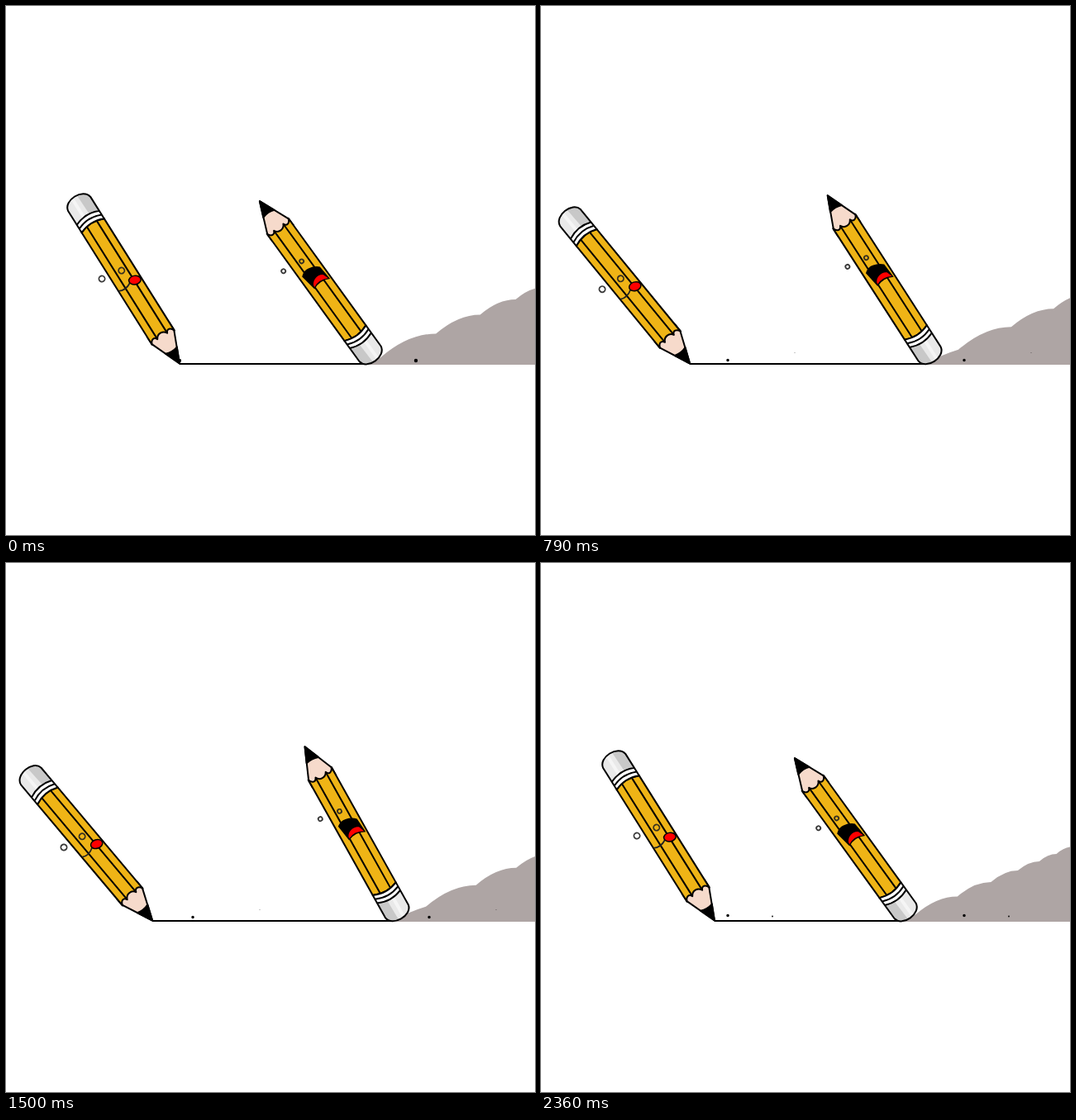
Write an HTML page that moves like this. It is 640 px wide and 640 px high and loops after 2430 ms.

```html
<!DOCTYPE html>
<html lang="en">
<head>
<meta charset="utf-8">
<title>Pencils</title>
<style>
  html, body { margin: 0; width: 100%; height: 100%; overflow: hidden; background: #fff; }
  svg { display: block; width: 100vw; height: 100vh; }
  .ink { stroke: #000; stroke-width: 2; stroke-linejoin: round; stroke-linecap: round; }
  .eye { fill: none; stroke: #222; stroke-opacity: .9; stroke-width: 1.8; }
</style>
</head>
<body>
<svg viewBox="0 0 640 640">
  <defs>
    <!-- tip at the origin, eraser upwards -->
    <g id="pencil">
      <path class="ink" fill="#f6dacb" d="M0 0L-16 -38V-48H16V-38Z"/>
      <path class="ink" d="M0 0L-8 -19Q0 -16 8 -18.5Z"/>
      <path class="ink" fill="#efb416" d="M-16 -197V-37C-14 -43 -9 -44 -7 -39C-4 -45 4 -45 7 -39C9 -44 14 -43 16 -37V-197Q0 -204 -16 -197Z"/>
      <path class="ink" fill="none" d="M-7 -200V-40M7 -200V-40"/>
      <path fill="#e9e9e9" d="M-16 -206V-228C-14 -242 14 -242 16 -228V-206Z"/>
      <path fill="#f5f5f5" d="M-6 -206V-236L-2 -238V-206Z"/>
      <path fill="#c8c8c8" d="M4 -206L3 -238Q14 -237 16 -228V-206Z"/>
      <path fill="#fff" d="M-16 -197V-208Q0 -215 16 -208V-197Q0 -204 -16 -197Z"/>
      <path class="ink" fill="none" d="M-16 -197V-228C-14 -242 14 -242 16 -228V-197Q0 -204 -16 -197M-16 -202.5Q0 -209.5 16 -202.5M-16 -208Q0 -215 16 -208"/>
    </g>
  </defs>

  <path id="hill" fill="#aea5a4"/>
  <path id="line" stroke="#000" stroke-width="2.2"/>

  <g id="left">
    <use href="#pencil"/>
    <g id="eyes">
      <circle class="eye" cx="-25" cy="-136.7" r="3.6"/>
      <circle class="eye" cx=".4" cy="-132.5" r="3.6"/>
    </g>
    <path fill="none" stroke="#222" stroke-width="1.7" d="M-16 -113.5Q-8 -109 1 -114.5"/>
    <ellipse cx="7.9" cy="-114.2" rx="7.3" ry="5.3" transform="rotate(22 7.9 -114.2)" fill="#f00" stroke="#000" stroke-width="1.5"/>
  </g>

  <!-- tip at the origin, eraser downwards -->
  <g id="right">
    <use href="#pencil" transform="rotate(180)"/>
    <circle class="eye" cx="-26.3" cy="85.4" r="2.5"/>
    <circle class="eye" cx="-1.5" cy="88.6" r="2.5"/>
    <path d="M-12 104Q-6 99 0 100.5Q8 102 12.5 107L14 126Q3 120 -8.5 125Z"/>
    <path fill="#f00" d="M-7 121C-4 114 6 113 10 117L12.5 124Q2 118.5 -7 123Z"/>
  </g>

  <path id="dust"/>
</svg>

<script>
const FPS = 14, LOOP = 2430, FRAMES = 34;
const GROUND = 433, TAU = 2 * Math.PI;
const el = id => document.getElementById(id);
const [hill, line, left, right, eyes, dust] =
  ['hill', 'line', 'left', 'right', 'eyes', 'dust'].map(el);

const ease = u => (1 - Math.cos(Math.PI * Math.min(1, Math.max(0, u)))) / 2;

// How far the pencils have moved apart, 0 to 1
function spread(n) {
  const p = TAU * (n + .5) / FRAMES;
  return .5 - .49 * Math.cos(p) - .01 * Math.cos(3 * p);
}

// How far the right pencil has straightened up, 0 to 1
const lean = n => ease(n < 20.8 ? (n - 2) / 18.8 : (32.8 - n) / 12);

// Rounded heaps up an even slope; their size and start shift with time
function hillPath(n, x0) {
  const height = x => GROUND - .43 * x;
  let x = (n + 1.6) % 6.6 < 2.5 ? 18 : 40;
  let gap = 58 + 9 * Math.cos(TAU * n * 7 / 15);
  let d = `M${x0} ${GROUND}Q${x0 + x / 2} ${height(x) + 6} ${x0 + x} ${height(x)}`;
  while (x0 + x < 640) {
    const next = x + gap, y = height(next);
    d += `Q${x0 + (x + next) / 2} ${y} ${x0 + next} ${y}`;
    x = next;
    gap = Math.max(20, gap * .8);
  }
  return d + `V434H${x0}Z`;
}

function dot(x, y, r) {
  return `M${x - r} ${y}a${r} ${r} 0 1 0 ${2 * r} 0a${r} ${r} 0 1 0 ${-2 * r} 0`;
}

// Two crumbs every five frames, flying right and shrinking
function dustPath(n, tip) {
  let d = '';
  for (let k = 0; k * 2.5 <= n + .5; k++) {
    const age = n - Math.floor(k * 2.5);
    if (age < 0 || age > 4) continue;
    const x = Math.max(tip, 199 + 27 * age);
    const y = 429 - (k % 2 ? 2.4 : .5) * age;
    const r = 2.2 * (1 - age / 5);
    d += dot(x, y, r) + dot(x + 286, y, r);
  }
  return d;
}

function draw(n) {
  const v = spread(n);
  const xl = 210 - 40 * v, xr = 645 - xl;
  left.setAttribute('transform', `translate(${xl} 432.5) rotate(${-32.1 - 9.7 * v})`);
  right.setAttribute('transform',
    `translate(${xr + 2} 416) rotate(${-35.9 + 6.7 * lean(n)}) translate(0 -222)`);
  line.setAttribute('d', `M${xl} ${GROUND}H${xr}`);
  hill.setAttribute('d', hillPath(n, xr));
  dust.setAttribute('d', dustPath(n, xl));
  const blink = n === 28 || n === 29;
  eyes.style.display = blink ? 'none' : '';
}

const start = performance.now();
let shown = -1;
function tick(now) {
  const t = Math.max(0, now - start) % LOOP;
  const n = Math.min(FRAMES - 1, Math.floor((t + 5) * FPS / 1000));
  if (n !== shown) draw(shown = n);
  requestAnimationFrame(tick);
}
tick(start);
</script>
</body>
</html>
```
